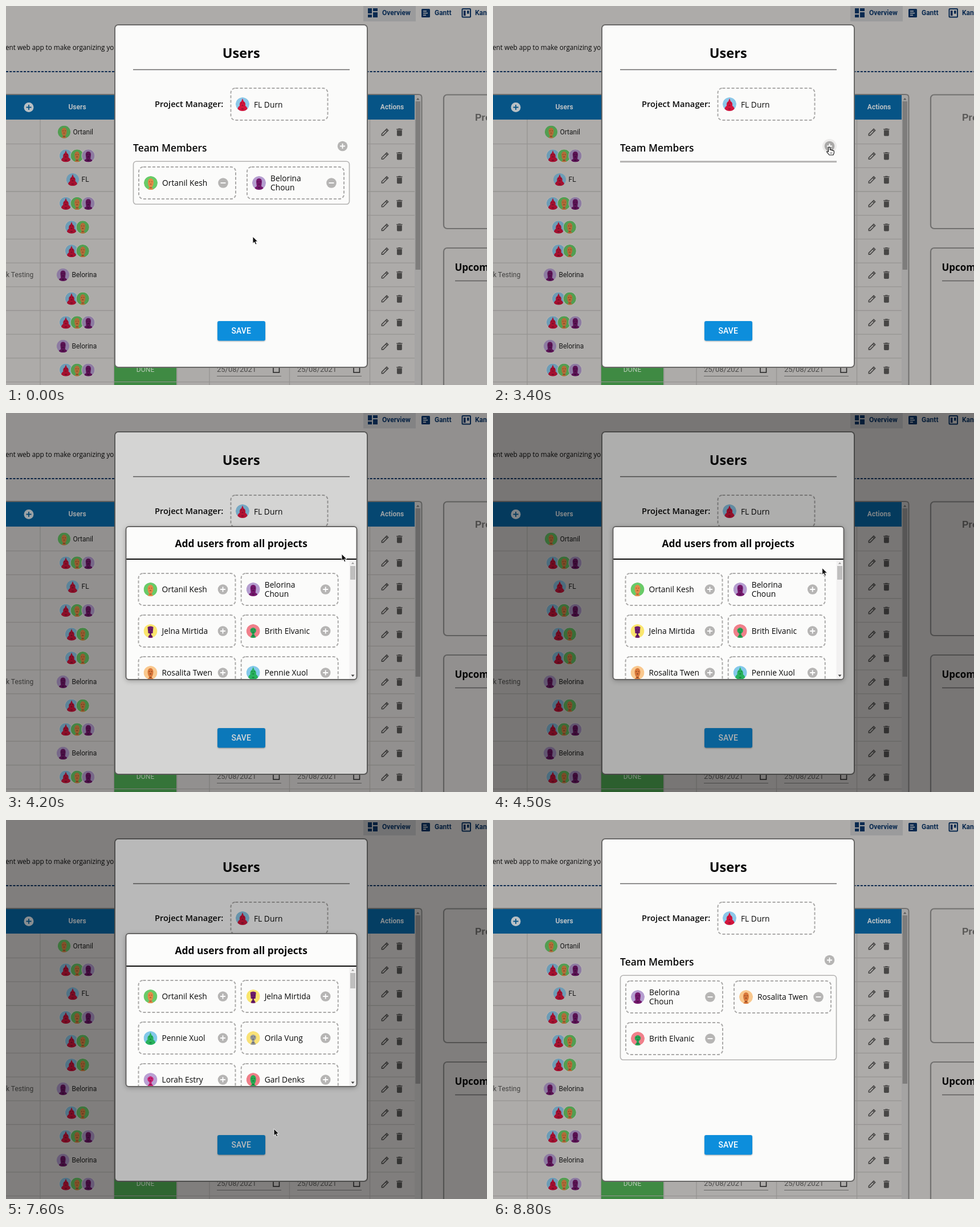
These frames come from a looping animation (844x664 px, 9.5 s). An HTML page:

```html
<!DOCTYPE html>
<html lang="en">
<head>
<meta charset="utf-8">
<title>Project users</title>
<style>
  html, body { margin: 0; width: 100%; height: 100%; overflow: hidden; background: #adaba9; }
  svg { display: block; width: 844px; height: 664px; }
  text { font-family: "Open Sans", "Noto Sans", sans-serif; fill: #080808; }
  .r { font-family: Roboto, Arial, sans-serif; }
  .l { font-family: "Liberation Sans", Arial, sans-serif; }
  .b { font-weight: 700; }
  .s { font-weight: 600; }
  .m { font-weight: 500; }
  .c { text-anchor: middle; }
  .dim { filter: brightness(.78); }
  .low { filter: drop-shadow(0 1px 1px rgba(0,0,0,.3)); }
  .lift { filter: drop-shadow(0 1px 3px rgba(0,0,0,.28)); }
  .deep { filter: drop-shadow(0 2px 4px rgba(0,0,0,.3)); }
</style>
</head>
<body>
<svg viewBox="0 0 844 664" xmlns="http://www.w3.org/2000/svg">
  <defs id="defs"></defs>
  <g id="page"></g>
  <g id="modal"></g>
  <g id="members"></g>
  <rect id="shade" width="844" height="664"/>
  <g id="dialog"></g>
  <g id="cursor"></g>
</svg>
<script>
const $ = id => document.getElementById(id);
const LOOP = 9500, STEP = 100, SHADE = 0.31;

// name, backdrop, skin, detail, head shape
const people = {
  lead:   ['FL Durn', '#8cc8e9', '#d3153c', '#7d1130', 'hood'],
  green:  ['Ortanil Kesh', '#69cb68', '#e48a48', '#96502a', 'oval'],
  violet: ['Belorina Choun', '#b59ed0', '#74176b', '#41103f', 'dome'],
  yellow: ['Jelna Mirtida', '#fae66e', '#6d1c6c', '#3c1240', 'block'],
  pink:   ['Brith Elvanic', '#f0808b', '#26a455', '#176234', 'bulb'],
  peach:  ['Rosalita Twen', '#f9c88e', '#d9773a', '#753a1c', 'oval'],
  sky:    ['Pennie Xuol', '#83c8ea', '#27b25c', '#15683a', 'hood'],
  lemon:  ['Orila Vung', '#f9e277', '#97999a', '#525455', 'bulb'],
  lilac:  ['Lorah Estry', '#b9a0d3', '#cb2273', '#6d1548', 'bulb'],
  rose:   ['Garl Denks', '#ef7f89', '#25ab51', '#176034', 'oval']
};
const heads = {
  hood: 'M-9 12Q-9 5-5 3Q-6-3-2-5L0-10L2-5Q6-3 5 3Q9 5 9 12z',
  oval: 'M-5 12Q-4 9-2 8Q-5 4-5-2Q-4-8 0-8Q4-8 5-2Q5 4 2 8Q4 9 5 12z',
  dome: 'M-8 12Q-8 7-4 6L-5-2Q-5-8 0-8Q5-8 5-2L4 6Q8 7 8 12z',
  block: 'M-4 12Q-4 8-1.5 7V4H-4L-5-7Q0-10 5-7L4 4H1.5V7Q4 8 4 12z',
  bulb: 'M-5 12Q-4 8-2 7V4Q-6 2-5-3Q0-9 5-3Q6 2 2 4V7Q4 8 5 12z'
};

const text = (x, y, str, size, cls = '', fill = '') =>
  `<text x="${x}" y="${y}" font-size="${size}" class="${cls}"${fill && ` style="fill:${fill}"`}>${str}</text>`;
const rect = (x, y, w, h, fill, r = 0, more = '') =>
  `<rect x="${x}" y="${y}" width="${w}" height="${h}" rx="${r}" fill="${fill}" ${more}/>`;
const path = (d, more) => `<path d="${d}" ${more}/>`;
const line = (d, stroke, w, more = '') => path(d, `fill="none" stroke="${stroke}" stroke-width="${w}" ${more}`);
const use = (id, x, y, k = 1) => `<use href="#${id}" transform="translate(${x} ${y}) scale(${k})"/>`;
const stroke = (color, w) => `stroke="${color}" stroke-width="${w}"`;

function drawDefs() {
  let s = '<clipPath id="round"><circle r="12"/></clipPath>' +
    '<clipPath id="list"><rect x="211" y="257" width="404" height="209"/></clipPath>';
  for (const [id, [, back, skin, detail, head]] of Object.entries(people)) {
    s += `<g id="${id}" clip-path="url(#round)"><circle r="12" fill="${back}"/>` +
      path(heads[head], `fill="${skin}"`) +
      line('M-2.8-2.2h1.6M1.2-2.2h1.6M-1.5 2.2h3M-2 8Q0 9 2 8', detail, 1.3) + '</g>';
  }
  s += '<g id="pen">' + line('M4 20v-3.5L16 4.5l3.5 3.5L7.5 20zM13.5 7l3.5 3.5', '#454443', 2.2) + '</g>' +
    '<g id="bin">' + path('M6 19c0 1.1.9 2 2 2h8c1.1 0 2-.9 2-2V7H6zM19 4h-3.5l-1-1h-5l-1 1H5v2h14z', 'fill="#474645"') + '</g>' +
    '<g id="arrow">' + path('M0 0V12.2L2.8 9.6L4.8 14L7 13L5 8.8H9z', 'fill="#111" stroke="#fff" stroke-width=".9"') + '</g>' +
    '<g id="hand">' + path('M-1.4 1Q0-.8 1.4 1V5L3.4 4.8L4 5.6L6 5.6L6.5 6.4Q8.4 6 8.4 8V10.5L7 14H0L-4.3 8.6Q-4.4 6.6-1.4 8.4z',
      'fill="#fff" stroke="#111" stroke-width="1.1" stroke-linejoin="round"') + line('M2 9v3M4.5 9v3', '#333', .8) + '</g>';
  $('defs').innerHTML = s;
}

function drawPage() {
  const navy = '#0a2a50', rule = '#969492', edge = '#71706f', pale = '#b9c0c4', head = '#065486';
  let s = rect(0, 0, 844, 664, '#adaba9') + rect(627, 0, 92, 27, '#9b9b9c');
  [[635, 4, 7, 9], [644, 4, 8, 5], [635, 15, 7, 5], [644, 11, 8, 9]].forEach(b => s += rect(...b, navy));
  s += text(660, 16, 'Overview', 12, 'r b', navy) + text(752, 16, 'Gantt', 12, 'r b', navy) +
    text(823, 16, 'Kanban', 12, 'r b', navy) + rect(729, 5, 15, 15, navy, 1.5) +
    line('M732 9h6M732 12.5h8M732 16h5', '#adaba9', 1.5) +
    rect(800.5, 5, 14.5, 14.5, 'none', 1, stroke(navy, 2)) + rect(803, 8, 3.5, 9, navy) + rect(809, 8, 3.5, 5.5, navy) +
    text(-1, 77, 'ent web app to make organizing your', 11.7) +
    line('M0 115H844', navy, 2, 'stroke-dasharray="4 2.2"');

  // table
  s += rect(0, 155, 718, 44, head) + text(125, 181, 'Users', 12, 'r b c', pale) +
    text(677.5, 181, 'Actions', 12, 'r b c', pale) + `<circle cx="40" cy="177.5" r="8.5" fill="${pale}"/>` +
    line('M35.5 177.5h9M40 173v9', head, 1.8);
  const trio = ['lead', 'green', 'violet'], duo = ['lead', 'green'];
  const rows = [['green'], trio, ['lead'], trio, duo, duo, ['violet'], duo, trio, ['violet'], trio];
  const solo = { green: 102, lead: 117, violet: 100 };
  rows.forEach((row, i) => {
    const y = 220.7 + i * 41.7;
    row.forEach((id, j) => {
      const x = row.length > 1 ? 135 - row.length * 10 + j * 19.7 : solo[id];
      s += (row.length > 1 ? `<circle cx="${x}" cy="${y}" r="12" fill="#b5b3b1"/>` : '') +
        `<g class="dim">${use(id, x, y, .93)}</g>`;
    });
    if (row.length < 2) s += text(solo[row[0]] + 15.5, y + 4, people[row[0]][0].split(' ')[0], 12, 'r', '#171717');
    s += line(`M0 ${y + 20.9}H718`, rule, 1.3) + use('pen', 656.5, y - 8.5, .72) + use('bin', 681.5, y - 8.5, .74);
    if (i === 1 || i === 5) s += rect(189.5, y - 20, 2, 40, '#b5927f');
  });
  s += line('M60 199V664M189.5 199V664M300 617V664M357 617V664M497.5 617V664M638.5 199V664', rule, 1.3) +
    text(0, 475, 'k Testing', 12, 'r', '#434241') +
    rect(190, 617.5, 109, 40.5, '#3f8a43') + rect(190, 659, 109, 5, '#3f8a43') +
    text(244.5, 641, 'DONE', 12, 'r c', '#b9c9b8');
  for (const x of [370, 511]) {
    s += text(x, 641, '25/08/2021', 13, 'r', '#4a4948') + line(`M${x} 648.5h113`, '#676665', 1) +
      line(`M${x + 99} 632v10h10.5v-10z`, '#222', 1.5);
  }
  s += rect(717, 155, 12, 509, '#a5a4a3') + rect(718.5, 167, 8.5, 295, '#7e7d7c') +
    path('M720 164.5l2.7-3.5 2.7 3.5z', 'fill="#5c5b5a"') +
    line('M0 155H724Q729.5 155 729.5 160V664', edge, 2) +
    rect(768, 155.5, 90, 234.5, 'none', 6, stroke(edge, 2.2)) +
    rect(768, 424, 90, 260, 'none', 6, stroke(edge, 2.2)) +
    text(823, 201, 'Progress', 17, 'l b', '#595857') + text(787.5, 464, 'Upcoming', 17, 'b') +
    line('M788 481.5H844', '#5e5d5c', 1.3);
  $('page').innerHTML = s;
}

const dashed = (x, y, hot) => rect(x, y, 170, 56, '#fbfbfa', 8,
  `${stroke('#aaa9a8', 2)} stroke-dasharray="5 3"${hot ? ' class="lift"' : ''}`);

const near = (p, x, y) => Math.hypot(p.x - x, p.y + 1 - y) < 11;
const onSave = p => p.x > 371 && p.x < 455 && p.y > 552 && p.y < 587;

function button(x, y, plus, hot) {
  return (hot ? `<circle cx="${x}" cy="${y}" r="12.5" fill="#ecebea"/>` : '') +
    `<circle cx="${x}" cy="${y}" r="8.8" fill="${hot ? '#a9a8a7' : '#b6b5b4'}"/>` +
    line(`M${x - 4.5} ${y}h9` + (plus ? `M${x} ${y - 4.5}v9` : ''), '#fff', 1.8);
}

function card(id, x, y, plus, p) {
  const cy = y + 28, name = people[id][0];
  const hot = p && p.x > x && p.x < x + 170 && p.y > y && p.y < y + 56;
  const [first, last] = name.split(' ');
  const label = id === 'violet'
    ? text(x + 41, cy - 3.5, first, 13.8) + text(x + 41, cy + 12.5, last, 13.8)
    : text(x + 41, cy + 5, name, 13.8);
  return dashed(x, y, hot) + use(id, x + 21, cy) + label + button(x + 148, cy, plus, p && near(p, x + 148, cy));
}

function drawModal(p) {
  $('modal').innerHTML = rect(191, 33, 443, 600, '#fbfbfa', 6, stroke('#6a6968', 2)) +
    text(412.7, 90.5, 'Users', 23.6, 'b c') + line('M223 111.5H603', '#696867', 1.3) +
    text(261, 177, 'Project Manager:', 14.7, 's') + dashed(394.5, 144, false) +
    use('lead', 415, 172) + text(435, 177.5, people.lead[0], 13.8) +
    text(223, 255, 'Team Members', 17.4, 's') + button(590.5, 245.5, true, p && near(p, 590.5, 245.5)) +
    rect(371, 552, 84, 34.5, p && onSave(p) ? '#0a70ae' : '#0d8edc', 3, 'class="low"') +
    text(412.7, 574, 'SAVE', 14, 'r m c', '#fff');
}

function drawMembers(ids, p) {
  const tall = Math.ceil(ids.length / 2);
  $('members').innerHTML = tall
    ? rect(223.5, 272.3, 379, 2 + 73 * tall, 'none', 5, stroke('#b3b2b1', 1.6)) +
      ids.map((id, i) => card(id, 233 + i % 2 * 190, 282 + (i >> 1) * 73, false, p)).join('')
    : line('M223 272.7H603', '#b3b2b1', 3);
}

function drawDialog(ids, p) {
  $('dialog').innerHTML = rect(210.5, 199, 405, 268, '#fcfcfb', 5, 'class="deep"') +
    text(412.7, 234.5, 'Add users from all projects', 17.4, 'b c') +
    '<g clip-path="url(#list)">' +
    ids.slice(0, 6).map((id, i) => card(id, 232.5 + i % 2 * 180.2, 281 + (i >> 1) * 73, true, p)).join('') +
    rect(602.5, 257, 12, 210, '#f2f1f1') + rect(604, 268, 9, 33 - ids.length, '#bfbebe') +
    path('M605.8 264.5l2.7-3 2.7 3z', 'fill="#999"') + path('M605.5 458.5l3 3.5 3-3.5z', 'fill="#444"') + '</g>' +
    line('M211 256H615', '#0a0a0a', 2) +
    rect(210.5, 199, 405, 268, 'none', 5, stroke('#666564', 2));
}

// time, x, y of the pointer tip
const route = [
  [200, 433, 404], [700, 381, 309], [1000, 381, 309], [1300, 398, 361], [1400, 398, 361],
  [1800, 381, 309], [2200, 381, 309], [2700, 413, 562], [2800, 413, 562], [3400, 590, 247],
  [4200, 589, 247], [4900, 560, 309], [5000, 560, 309], [5600, 560, 381], [5900, 560, 381],
  [6600, 380, 381], [6700, 380, 381], [7200, 470, 541], [8200, 470, 541], [8700, 38, 4]
];

function smooth(k) {
  k = Math.min(1, Math.max(0, k));
  return k * k * (3 - 2 * k);
}

function pointer(t) {
  const i = route.findIndex(r => r[0] >= t);
  const b = i < 0 ? route[route.length - 1] : route[i], a = route[i - 1] || b;
  const k = b[0] > a[0] ? smooth((t - a[0]) / (b[0] - a[0])) : 1;
  return { x: a[1] + (b[1] - a[1]) * k, y: a[2] + (b[2] - a[2]) * k };
}

function membersAt(t) {
  if (t < 1100) return ['green', 'violet'];
  if (t < 2300) return ['violet'];
  return ['violet', 'peach', 'pink'].filter((id, i) => t >= [5000, 5900, 6700][i]);
}

function render(t) {
  const p = pointer(t), open = t >= 4100 && t < 7700, members = membersAt(t);
  const under = open || t >= 8300 ? null : p;
  drawModal(under);
  drawMembers(members, under);
  $('shade').setAttribute('opacity', open ? SHADE * smooth((t - 4060) / 280) * (1 - smooth((t - 7530) / 280)) : 0);
  if (open) {
    const spare = Object.keys(people).filter(id => id !== 'lead' && !members.includes(id));
    drawDialog(spare, p);
  } else {
    $('dialog').innerHTML = '';
  }
  const inDialog = open && p.y > 257 && p.y < 466 &&
    [380.5, 560.7].some(x => [309, 382, 455].some(y => near(p, x, y)));
  const slots = [[381, 310], [571, 310]].slice(0, members.length);
  const inModal = under && (near(p, 590.5, 245.5) || slots.some(([x, y]) => near(p, x, y)) || onSave(p));
  $('cursor').innerHTML = t < 8800 ? use(inDialog || inModal ? 'hand' : 'arrow', p.x, p.y) : '';
}

drawDefs();
drawPage();
const start = performance.now();
let last = -1;
function tick() {
  const t = Math.floor((performance.now() - start) % LOOP / STEP) * STEP;
  if (t !== last) render(last = t);
  requestAnimationFrame(tick);
}
tick();
</script>
</body>
</html>
```
